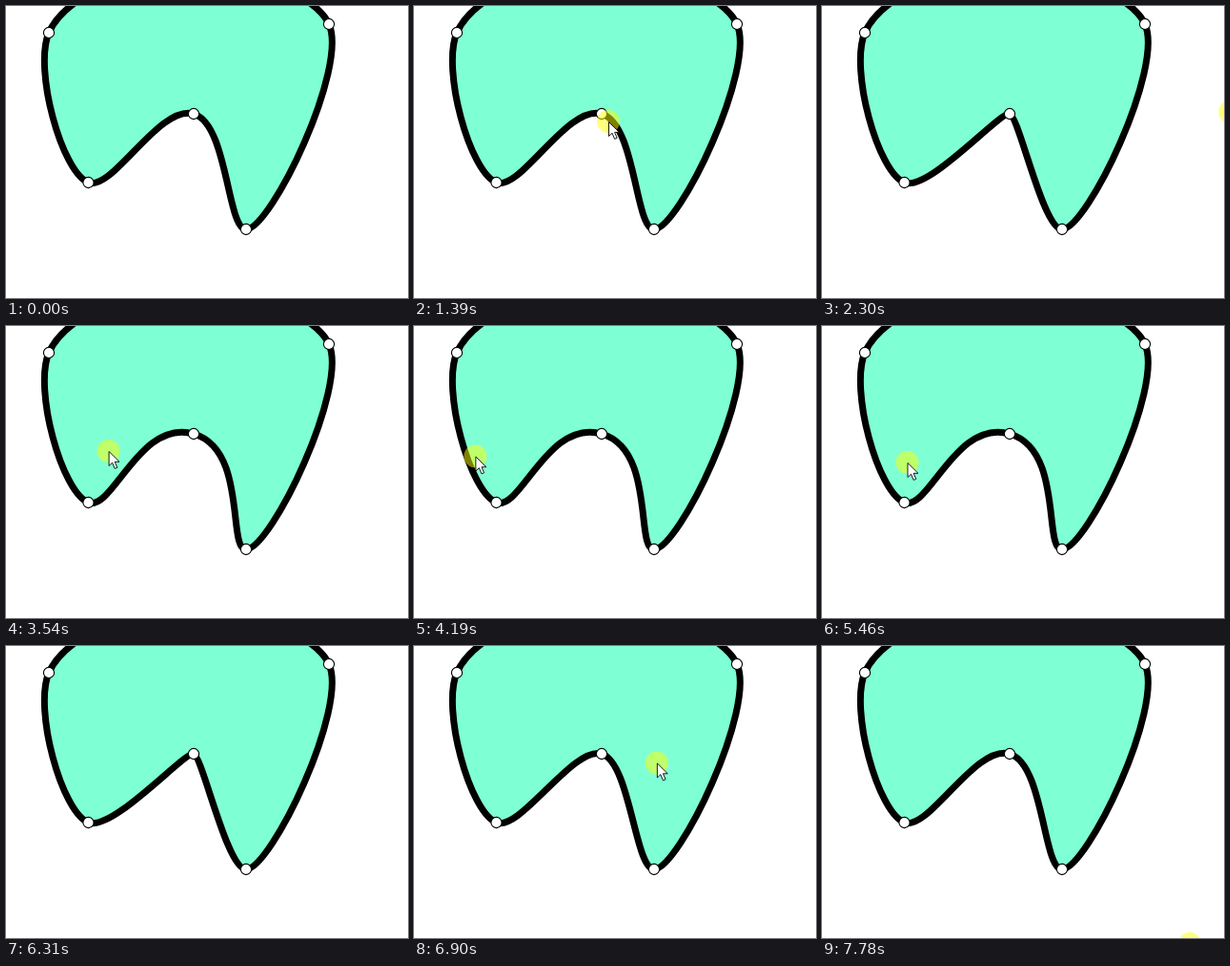
An HTML page for the animation above (7.98 s loop, 422x306 px).

```html
<!DOCTYPE html>
<html lang="en">
<head>
<meta charset="utf-8">
<title>Curve tension</title>
<style>
  html, body { margin: 0; width: 100%; height: 100%; overflow: hidden; background: #fff; }
  svg { display: block; }
</style>
</head>
<body>
<svg width="422" height="306" viewBox="0 0 422 306">
  <path id="shape" fill="#7fffd4" stroke="#000" stroke-width="7"/>
  <g id="nodes" fill="#fff" stroke="#000" stroke-width="1.1"></g>
  <g id="cursor">
    <circle r="12" fill="#ff0" fill-opacity=".5"/>
    <path d="M.5 .5V15.5L4 12.2L6.6 18.4L9.2 17.3L6.6 11.3H11.4Z" fill="#fff" stroke="#000" stroke-width=".9"/>
  </g>
</svg>
<script>
const LOOP = 7980, GRAB = 1690, RELEASE = 7050, HOME = 204;
const $ = id => document.getElementById(id);

const nodes = [[45, 28], [86.5, 185], [197, 113], [252, 234], [339, 19], [170, -40]];
const DRAGGED = 2;

// Turning points of the cursor: time, x, y
const path = [
  [0, 386, 330], [130, 378, 304], [460, 210, 30], [700, 240, 218], [1090, 240, 218],
  [1390, HOME, 121], [GRAB, HOME, 121], [2300, 428, 111], [2900, 560, 114],
  [3090, 400, 119], [3540, 108, 131], [3895, 8, 141], [4640, 339, 120], [4670, 530, 118],
  [4730, 397, 119], [5460, 90, 143], [5535, 46, 145], [6290, 434, 121], [6560, 434, 121],
  [RELEASE, HOME, 124], [7360, 383, 279], [7520, 386, 324], [7770, 386, 324],
  [7780, 386, 312], [LOOP, 386, 312]
];

const slope = (i, c) => path[i] && path[i + 1]
  ? (path[i + 1][c] - path[i][c]) / (path[i + 1][0] - path[i][0]) : 0;

// Harmonic mean keeps the motion from overshooting its turning points
function speed(i, c) {
  const a = slope(i - 1, c), b = slope(i, c);
  return a * b > 0 ? 2 * a * b / (a + b) : 0;
}

function cursorAt(t) {
  const i = path.findLastIndex(p => p[0] <= t), p = path[i], q = path[i + 1];
  const d = q[0] - p[0], u = (t - p[0]) / d;
  return [1, 2].map(c => p[c] + (q[c] - p[c]) * u * u * (3 - 2 * u)
    + d * u * (1 - u) * ((1 - u) * speed(i, c) - u * speed(i + 1, c)));
}

// Pulling left rounds the dragged node, pulling right sharpens it
function tension(t, x) {
  const pull = t > GRAB && t < RELEASE ? HOME - x : 0;
  return Math.min(2.05, Math.max(0, 1.3 + pull * (pull > 0 ? .008 : .0042)));
}

// Bezier handles of a centripetal Catmull-Rom spline
function handles(i, scale) {
  const n = nodes.length, a = nodes[(i + n - 1) % n], b = nodes[i], c = nodes[(i + 1) % n];
  const d = Math.sqrt(Math.hypot(b[0] - a[0], b[1] - a[1]));
  const e = Math.sqrt(Math.hypot(c[0] - b[0], c[1] - b[1]));
  const v = [0, 1].map(k =>
    scale / 3 * ((b[k] - a[k]) / d - (c[k] - a[k]) / (d + e) + (c[k] - b[k]) / e));
  return { before: b.map((x, k) => x - v[k] * d), after: b.map((x, k) => x + v[k] * e) };
}

function outline(s) {
  const h = nodes.map((_, i) => handles(i, i === DRAGGED ? s : 1));
  return 'M' + nodes[0] + nodes.map((_, i) => {
    const j = (i + 1) % nodes.length;
    return `C${h[i].after} ${h[j].before} ${nodes[j]}`;
  }).join('') + 'Z';
}

$('nodes').innerHTML = nodes.map(([x, y]) => `<circle cx="${x}" cy="${y}" r="5.6"/>`).join('');

function draw() {
  const t = performance.now() % LOOP, [x, y] = cursorAt(t);
  $('shape').setAttribute('d', outline(tension(t, x)));
  $('cursor').setAttribute('transform', `translate(${x} ${y})`);
  requestAnimationFrame(draw);
}
draw();
</script>
</body>
</html>
```
